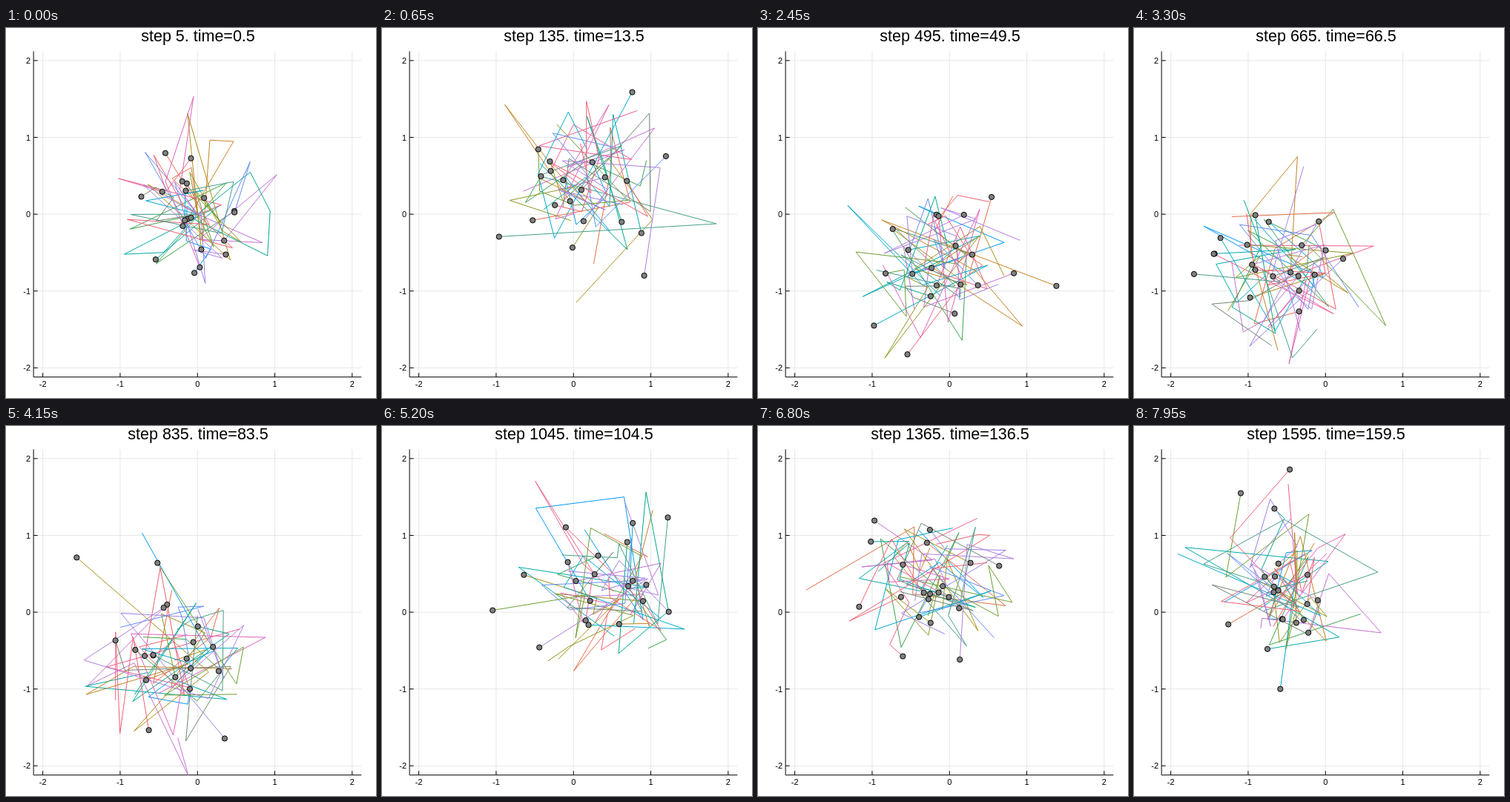
An HTML page with a canvas for the animation above (8 s loop, 499 by 499 pixels).

```html
<!DOCTYPE html>
<html lang="en">
<head>
<meta charset="utf-8">
<title>Wandering swarm</title>
<style>
  html, body { margin: 0; width: 100%; height: 100%; overflow: hidden; background: #fff; }
  canvas { display: block; width: 499px; height: 499px; }
</style>
</head>
<body>
<canvas id="plot" width="499" height="499"></canvas>
<script>
const FRAME_MS = 50, FRAMES = 160, TRAIL = 5, SPREAD = 0.5, LIMIT = 2.12;
const FONT = '"Liberation Sans", Arial, sans-serif';
const COLORS = ['#009afa', '#e36f47', '#3ea44e', '#c371d2', '#ac8e18', '#00aaae', '#ed5e93',
  '#c68225', '#00a98d', '#8e971e', '#00a9cc', '#9b7fe9', '#618df6', '#f06073', '#dd65b6',
  '#6c9f33', '#479f8a', '#f55f73', '#b07fe0', '#718772'];

const ctx = document.getElementById('plot').getContext('2d');
const toX = x => 258.25 + 104.3 * x;
const toY = y => 251.1 - 103.6 * y;
const LEFT = toX(-LIMIT), RIGHT = toX(LIMIT), TOP = toY(LIMIT), BOTTOM = toY(-LIMIT);

function randomSource(seed) {
  let s = seed;
  return () => {
    s = (s + 0x6D2B79F5) | 0;
    let r = Math.imul(s ^ (s >>> 15), 1 | s);
    r = (r + Math.imul(r ^ (r >>> 7), 61 | r)) ^ r;
    return ((r ^ (r >>> 14)) >>> 0) / 4294967296;
  };
}

// The swarm leaves the origin, sways sideways and makes one long dip
function centreAt(frame) {
  const leave = 1 - Math.exp(-frame / 8);
  const sway = -0.05 + 0.5 * Math.sin(2 * Math.PI * (frame - 4) / 85);
  const dip = 0.42 - 1.15 * Math.exp(-(((frame - 67) / 30) ** 4));
  return [leave * sway, leave * dip];
}

// Head first; the opening trails still reach back to the origin
function trailsAt(frame) {
  const random = randomSource((frame + 1) * 7919);
  const [cx, cy] = centreAt(frame);
  return COLORS.map(() => Array.from({ length: TRAIL }, (_, age) => {
    const atOrigin = frame === 0 && age === TRAIL - 1;
    const r = atOrigin ? 0 : SPREAD * Math.sqrt(-2 * Math.log(1 - random()));
    const a = 2 * Math.PI * random();
    return [toX(cx + r * Math.cos(a)), toY(cy + r * Math.sin(a))];
  }));
}

function path(points, color) {
  ctx.strokeStyle = color;
  ctx.beginPath();
  points.forEach(p => ctx.lineTo(p[0], p[1]));
  ctx.stroke();
}

function label(text, x, y, size, align) {
  ctx.font = `${size}px ${FONT}`;
  ctx.textAlign = align;
  ctx.fillText(text, x, y);
}

function drawAxes(frame) {
  ctx.fillStyle = '#fff';
  ctx.fillRect(0, 0, 499, 499);
  ctx.lineWidth = 1;
  ctx.fillStyle = '#000';
  for (let v = -2; v <= 2; v++) {
    const x = toX(v), y = toY(v);
    path([[x, TOP], [x, BOTTOM]], '#e6e6e6');
    path([[LEFT, y], [RIGHT, y]], '#e6e6e6');
    path([[x, BOTTOM], [x, BOTTOM - 5.5]], '#000');
    path([[LEFT, y], [LEFT + 5.5, y]], '#000');
    label(v, x, 484, 11, 'center');
    label(v, 33, y + 4, 11, 'right');
  }
  path([[LEFT, TOP], [LEFT, BOTTOM], [RIGHT, BOTTOM]], '#000');
  label(`step ${5 + frame * 10}. time=${(0.5 + frame).toFixed(1)}`, 259, 18.4, 21.5, 'center');
}

function draw(frame) {
  drawAxes(frame);
  ctx.save();
  ctx.beginPath();
  ctx.rect(LEFT, TOP, RIGHT - LEFT, BOTTOM - TOP);
  ctx.clip();
  ctx.lineJoin = 'bevel';
  const trails = trailsAt(frame);
  trails.forEach((trail, i) => path(trail, COLORS[i]));
  ctx.fillStyle = '#808080';
  ctx.strokeStyle = '#000';
  for (const [[x, y]] of trails) {
    ctx.beginPath();
    ctx.arc(x, y, 3.6, 0, 2 * Math.PI);
    ctx.fill();
    ctx.stroke();
  }
  ctx.restore();
}

const start = performance.now();
let shown = -1;
function tick() {
  const elapsed = Math.max(0, performance.now() - start);
  const frame = Math.floor(elapsed / FRAME_MS) % FRAMES;
  if (frame !== shown) draw(shown = frame);
  requestAnimationFrame(tick);
}
tick();
</script>
</body>
</html>
```
